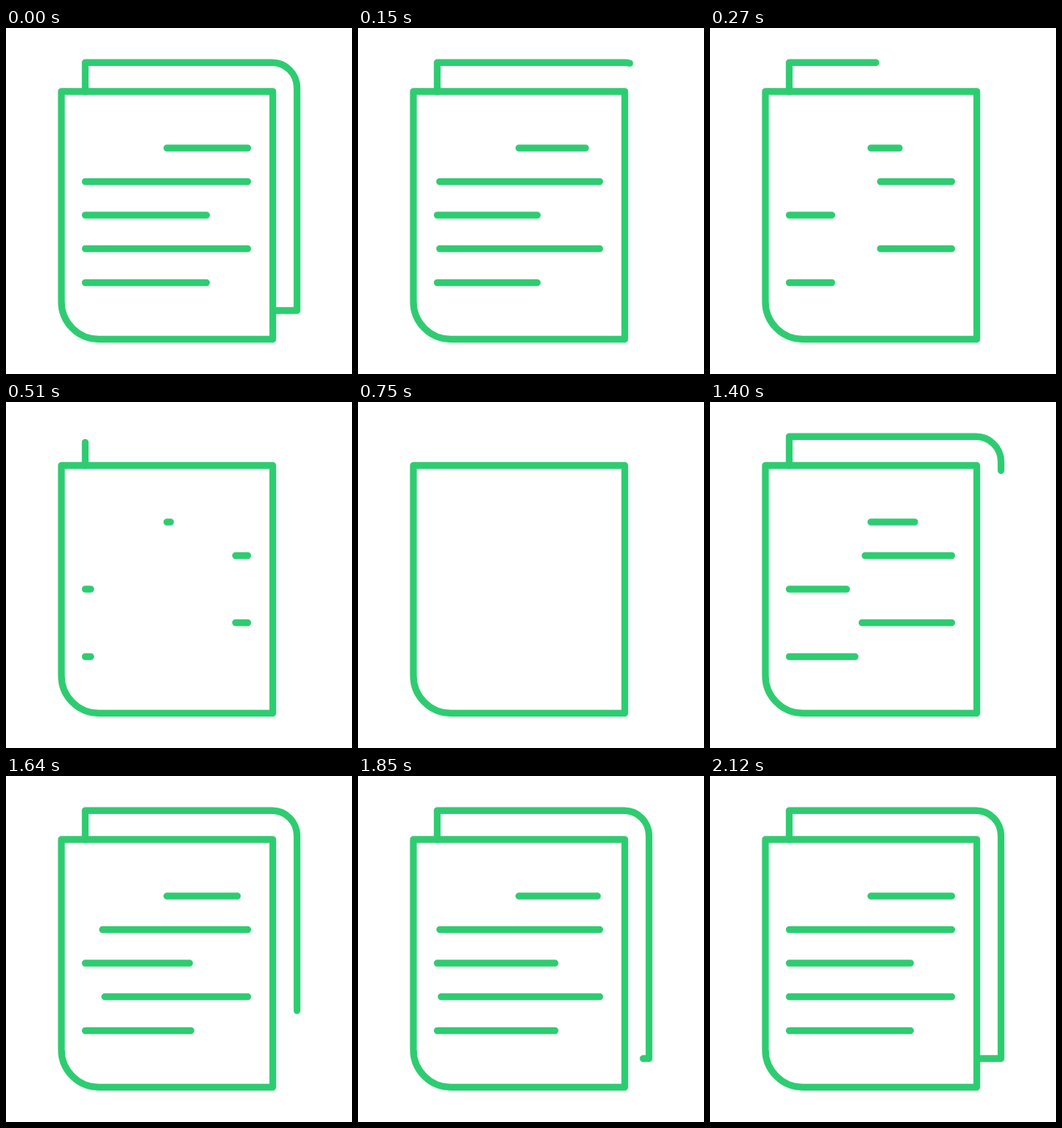
Write an HTML page that moves like this. It is 428 px wide and 428 px high and loops after 4270 ms.

```html
<!DOCTYPE html>
<html lang="en">
<head>
<meta charset="utf-8">
<title>Document lines</title>
<style>
  html, body { margin: 0; height: 100%; overflow: hidden; background: #fff; }
  svg { display: block; width: 100%; height: 100%; }
  path { fill: none; stroke: #2ecc71; stroke-width: 8.4; stroke-linecap: round; stroke-linejoin: round; }
</style>
</head>
<body>
<svg viewBox="0 0 428 428">
  <path d="M68.5 78.5H330V385H115A46.5 46.5 0 0 1 68.5 338.5Z"/>
</svg>
<script>
const LOOP = 4270, STEP = 30, GONE = 750, REDRAW = 1250, DONE = 2120;

// path, erase start, erase duration, draw start, draw duration (ms)
const strokes = [
  ['M98 78.5V42.8H329A31 31 0 0 1 360 73.8V349.5H330', 0, 890, 1247, 1000],
  ['M199 148.5H299', 125, 669, 1247, 950],
  ['M299 190H98', 148, 720, 1270, 830],
  ['M98 231.5H248', 125, 669, 1283, 897],
  ['M299 273H98', 148, 720, 1247, 925],
  ['M98 315H248', 125, 669, 1247, 950],
].map(([d, ...timing]) => {
  const el = document.createElementNS('http://www.w3.org/2000/svg', 'path');
  el.setAttribute('d', d);
  document.querySelector('svg').prepend(el);
  return { el, timing, length: el.getTotalLength() };
});

// cubic-bezier(.187, 1, .594, 1)
function ease(x) {
  if (x <= 0) return 0;
  if (x >= 1) return 1;
  let lo = 0, hi = 1;
  for (let i = 0; i < 24; i++) {
    const s = (lo + hi) / 2, u = 1 - s;
    if (3 * .187 * s * u * u + 3 * .594 * s * s * u + s * s * s < x) lo = s;
    else hi = s;
  }
  return 1 - (1 - lo) ** 3;
}

function shown(t, [outAt, outFor, inAt, inFor]) {
  if (t >= DONE) return 1;
  if (t >= REDRAW) return ease((t - inAt) / inFor);
  return t >= GONE ? 0 : 1 - ease((t - outAt) / outFor);
}

function frame() {
  const now = performance.now() % LOOP;
  const base = now < REDRAW ? 0 : REDRAW;
  const t = base + Math.floor((now - base) / STEP) * STEP;
  for (const { el, timing, length } of strokes) {
    const visible = length * shown(t, timing);
    el.style.strokeDasharray = `${visible} 2000`;
    el.style.visibility = visible < .5 ? 'hidden' : 'visible';
  }
  requestAnimationFrame(frame);
}
frame();
</script>
</body>
</html>
```
